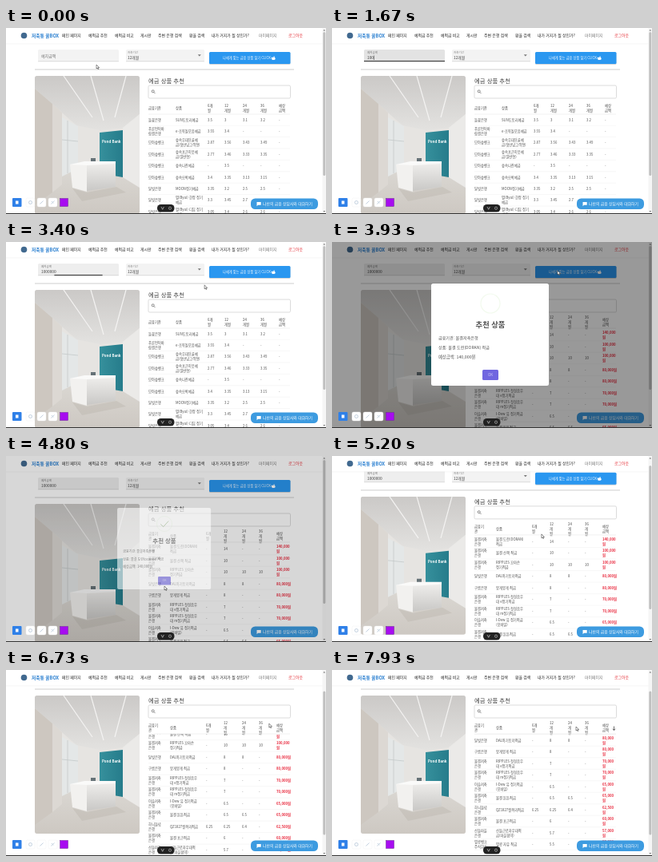
Recreate the animation shown at these times as an HTML page. Size 400 by 233 pixels, loop 8 s.

```html
<!DOCTYPE html>
<html lang="ko">
<head>
<meta charset="utf-8">
<style>
html, body { margin: 0; width: 100%; height: 100%; overflow: hidden; background: #fff; }
svg { display: block; width: 400px; height: 233px; }
text { font-family: 'Noto Sans CJK KR', 'Noto Sans CJK', sans-serif; white-space: pre; }
</style>
</head>
<body>
<svg id="stage" viewBox="0 0 400 233">
  <defs>
    <clipPath id="photoClip"><rect x="36" y="60" width="131" height="173" rx="3"/></clipPath>
    <clipPath id="rowClip"><rect x="176" y="108" width="182" height="160"/></clipPath>
    <linearGradient id="ceiling" x2="0" y2="1"><stop stop-color="#cbc9c7"/><stop offset="1" stop-color="#e3e2e0"/></linearGradient>
    <linearGradient id="floor" x2="0" y2="1"><stop stop-color="#dad7d2"/><stop offset="1" stop-color="#cdc8c2"/></linearGradient>
    <linearGradient id="desk" x2="0" y2="1"><stop stop-color="#efeeec"/><stop offset="1" stop-color="#c9c8c6"/></linearGradient>
    <linearGradient id="teal" x2="1"><stop stop-color="#36909c"/><stop offset="1" stop-color="#267c8b"/></linearGradient>
  </defs>
  <g id="page">
    <rect id="field" x="40" y="27" width="101" height="15" rx="1.5"/>
    <rect x="150" y="27" width="98" height="15" rx="1.5" fill="#f3f3f3"/>
    <path d="M40 41.8H141M150 41.8H248" stroke="#b4b4b4" stroke-width=".4"/>
    <rect id="underline" x="-50.5" y="40.9" width="101" height="1.2" fill="#444"/>
    <g id="label"></g>
    <rect id="caret" y="34.5" width=".5" height="5.5" fill="#222"/>
    <path d="M239.800 33.200h4l-2 2.200z" fill="#777"/>
    <rect x="254" y="30.400" width="101.500" height="15.500" rx="1.500" opacity=".15"/>
    <rect x="254" y="30" width="101.500" height="15" rx="1.500" fill="#2a97f0"/>
    <path d="M331.500 36.700h3v-1.200h1.200v1.500q1 .3 1 1.500t-1.500 1.500h-2.500l-.8-1.800z" fill="#fff"/>
    <path d="M36 52H360" stroke="#b9b9b9" stroke-width=".7"/>
    <g clip-path="url(#photoClip)">
      <rect x="36" y="60" width="131" height="173" fill="#e6e4e1"/>
      <path d="M36 60H167V108L146 125 117 128 88 122 36 76Z" fill="url(#ceiling)"/>
      <path d="M72 60 108 112M106 60 122 116M150 60 136 112" stroke="#f4f3f2" stroke-width="1.200"/>
      <path d="M36 204 82 178H146L167 194V233H36Z" fill="url(#floor)"/>
      <path d="M70 112 90 123V176L70 186Z" fill="#e4e7e7"/>
      <path d="M77 116V182M70 140 90 142" stroke="#c4caca" stroke-width=".8"/>
      <path d="M117 131 146 128V187L117 182Z" fill="url(#teal)"/>
      <path d="M146 125 167 108V200L146 187Z" fill="#ebeae8"/>
      <path d="M36 76 58 95V206L36 222Z" fill="#cdc7c0"/>
      <path d="M58 95 70 106V196L58 206Z" fill="#dcd8d3"/>
      <path d="M98 169H137V199L101 204Z" fill="url(#desk)"/>
      <path d="M80 171 101 169V205L83 200Z" fill="#f2f1ef"/>
      <path d="M80 171 98 167H137V170L101 172Z" fill="#fafaf9"/>
      <path d="M106 163h6v4h-6z" fill="#667277"/>
      <path d="M83 201 101 206 138 199 150 206 95 217Z" fill="#b4aea6" opacity=".35"/>
    </g>
    <rect id="search" x="178" y="72" width="177.500" height="16" rx="1.500" fill="#fff" stroke-width=".7"/>
    <g fill="none" stroke="#555" stroke-width=".7"><circle cx="183.700" cy="79.300" r="1.500"/><path d="M184.800 80.400 186.500 82.100"/></g>
    <g id="before"></g>
    <g id="after"></g>
    <path id="sortMark" d="M352.500 98.500v5m-1.800-1.800 1.800 1.800 1.800-1.800" fill="none" stroke="#333" stroke-width=".7"/>
  </g>
  <g id="header">
    <rect width="400" height="20.300" opacity=".05"/>
    <rect width="400" height="19.500" fill="#fff"/>
    <circle cx="22.500" cy="9.500" r="3.800" fill="#41698f"/>
  </g>
  <g id="chat">
    <rect x="306" y="213.500" width="84" height="13.500" rx="5.500" fill="#3d9be0"/>
    <path d="M313.500 218h5.200v3.800h-3.600l-1.600 1.400z" fill="#fff"/>
  </g>
  <rect x="395.500" width="4.500" height="233" fill="#f5f5f5"/>
  <path d="M396.500 3.500 397.800 1.700 399.100 3.500ZM396.500 229 397.800 230.800 399.100 229Z" fill="#777"/>
  <rect id="thumb" x="396.300" width="3" height="180" rx="1.500" fill="#c0c0c0"/>
  <rect id="shade" width="400" height="233"/>
  <g id="modal">
    <rect x="124" y="52" width="147" height="128" rx="2.500" fill="#fff"/>
    <circle cx="198" cy="77" r="12" fill="none" stroke="#a5dc86" stroke-opacity=".15" stroke-width="1.200"/>
    <path id="check" d="M192 77.500 196.300 81.700 204.500 72.700" pathLength="1" stroke-dasharray="1 2" fill="none" stroke="#a9c49a" stroke-width="1.200"/>
    <rect x="188" y="160" width="20" height="13" rx="1.500" fill="#7066e0"/>
  </g>
  <rect x="189" y="221" width="21.500" height="9.500" rx="4.500" fill="#222"/>
  <path d="M194 224l1.700 3.300 1.700-3.300" fill="none" stroke="#bbb" stroke-width=".8"/>
  <circle cx="205" cy="225.700" r="1.600" fill="none" stroke="#bbb" stroke-width=".7"/>
  <g id="tools">
    <rect x="8" y="213" width="11.500" height="11" rx="1" fill="#2f80e8"/>
    <path d="M12 216.500h3.500v4H12z" fill="#fff"/>
    <g fill="#fff" stroke="#f0f0f0" stroke-width=".4">
      <rect x="25" y="213" width="11" height="11" rx="2"/><rect x="39" y="213" width="11" height="11" rx="2"/><rect x="53" y="213" width="11" height="11" rx="2"/>
    </g>
    <g fill="none" stroke="#b3c4d6" stroke-width=".8"><circle cx="30.500" cy="218.500" r="2"/><path d="M42.500 220.500l4-4M56.500 220.500l4-4M57 217l2.500 2.500"/></g>
    <rect x="67.500" y="213.500" width="10" height="10" fill="#a70cf0" stroke="#6d2a93" stroke-width=".5"/>
  </g>
  <path d="M0 232.500H400" stroke="#333"/>
  <path id="cursor" d="M0 0V5L1.200 3.900 2 5.700 2.800 5.300 2 3.600H3.600Z" fill="#fff" stroke="#222" stroke-width=".5"/>
</svg>
<script>
const $ = id => document.getElementById(id);
const NS = 'http://www.w3.org/2000/svg';
const set = (el, attrs) => { for (const k in attrs) el.setAttribute(k, attrs[k]); return el; };
const add = (parent, tag, attrs = {}) => parent.appendChild(set(document.createElementNS(NS, tag), attrs));

// Draws text centred on y; "|" breaks the line.
function write(parent, x, y, str, size, fill = '#444', more = {}) {
  const lines = str.split('|');
  return lines.map((line, i) => {
    const mid = y + (i - (lines.length - 1) / 2) * 6;
    const el = add(parent, 'text', { x, y: mid + size * .36, 'font-size': size, fill, ...more });
    el.textContent = line;
    return el;
  })[0];
}
const centred = { 'text-anchor': 'middle' };

const oldRows = `들꽃은행;SUN도토리예금;3.5;3;3.1;3.2;-
푸른언덕바|람결은행;e-조약돌모음예금;3.55;3.4;-;-;-
모아숲뱅크;숲속우대단골예|금(첫만남고객형);2.87;3.56;3.43;3.49;-
모아숲뱅크;숲속포근이웃예|금(일반형);2.77;3.46;3.33;3.35;-
모아숲뱅크;숲속나란예금;-;3.5;-;-;-
모아숲뱅크;숲속또박예금;3.4;3.35;3.13;3.15;-
달빛은행;MOON정기예금;3.35;3.2;2.5;2.5;-
달빛은행;별(Byul) 한정 정기|예금;3.3;3.45;2.7;-;-
달빛은행;별(Byul) 디딤 정기|예금;3.05;3.4;2.6;2.6;-`;
const newRows = `물결저축|은행;물결 도란(DORAN)|적금;-;14;-;-;140,000|원
물결저축|은행;물결 산책 적금;-;10;-;-;100,000|원
물결저축|은행;RIPPLES 꼬마손|정기적금;-;10;10;10;100,000|원
달빛은행;DAL아기토끼적금;-;8;8;-;80,000원
구름은행;뭉게뭉게 적금;-;8;-;-;80,000원
물결저축|은행;RIPPLES 첫걸음우|대 e정기적금;-;7;-;-;70,000원
물결저축|은행;RIPPLES 첫걸음우|대 m정기적금;-;7;-;-;70,000원
이슬저축|은행;I-Dew 유 정기적금|(모바일);-;6.5;-;-;65,000원
물결저축|은행;물결 튼튼적금;-;6.5;6.5;-;65,000원
하늬들녘|은행;QZ1827월복리적금;6.25;6.25;6.4;-;62,500원
물결저축|은행;물결 포근적금;-;6;-;-;60,000원
산들마을|은행;산들근로자우대적|금(마을협약);-;5.7;-;-;57,000원
별콩뱅크|주식회사;별콩 자유 적금;-;5.5;-;-;55,000원`;

// Sums are drawn twice, for the wide and the narrow last column.
function table(parent, head, cols, rows, top, pitch) {
  head.split(';').forEach((s, i) => write(parent, cols[i], 100.5, s, 4.3, '#444'));
  add(parent, 'path', { d: 'M178 108H355', stroke: '#e2e2e2', 'stroke-width': .5 });
  const list = add(add(parent, 'g', { 'clip-path': 'url(#rowClip)' }), 'g');
  const wide = add(list, 'g'), narrow = add(list, 'g');
  rows.split('\n').forEach((row, r) => {
    const y = top + r * pitch;
    const cells = row.split(';');
    const sum = cells.pop();
    cells.forEach((s, i) => write(list, cols[i], y, s, 4.3, '#505050'));
    const style = sum == '-' ? ['#505050'] : ['#e8283c', { 'font-weight': 700 }];
    write(wide, cols[6], y, sum, 4.3, ...style);
    write(narrow, cols[6], y, sum.replace(/\|?원/, '|원'), 4.3, ...style);
    add(list, 'path', { d: `M178 ${y + pitch / 2}H355`, stroke: '#ebebeb', 'stroke-width': .4 });
  });
  return { list, wide, narrow };
}
const before = table($('before'), '금융기관;상품;6개|월;12|개월;24|개월;36|개월;예상|금액',
  [178, 212, 252, 273, 296, 318, 341], oldRows, 115, 14.4);
const after = table($('after'), '금융기|관;상품;6개|월;12|개|월;24|개|월;36|개|월;예상|금액',
  [178, 205, 250, 272, 295, 316, 338], newRows, 116.5, 14.5);
set(before.narrow, { opacity: 0 });

const page = $('page'), header = $('header'), modal = $('modal');
write($('label'), 0, 0, '예치금액', 5, '#777');
const amount = write(page, 44, 37.5, ' ', 4.8);
write(page, 152, 31, '저축기간', 3.5, '#888');
write(page, 152, 37.5, '12개월', 4.8);
write(page, 301, 37.7, '나에게 맞는 금융 상품 찾기 CLICK', 4.2, '#fff', centred);
write(page, 178, 66.5, '예금 상품 추천', 7.4, '#444');
write(page, 120, 142, 'Pond Bank', 4.4, '#fff', { 'font-weight': 700 });

write(header, 32, 9.5, '저축통 꿀BOX', 5.7, '#2a7fd0', { 'font-weight': 700 });
[[70, '메인 페이지'], [103, '예적금 추천'], [136, '예적금 비교'], [168, '게시판'], [190, '주변 은행 검색'],
 [229, '환율 검색'], [257, '내가 거지가 될 상인가?'], [316, '마이페이지', '#777'], [353, '로그아웃', '#e5343c']]
  .forEach(([x, s, fill = '#222']) => write(header, x, 9.7, s, 4.9, fill));
write($('chat'), 321, 220.2, '나만의 금융 상담사와 대화하기', 4.85, '#fff', { 'font-weight': 500 });

write(modal, 198, 104, '추천 상품', 9.3, '#545454', { ...centred, 'font-weight': 700 });
write(modal, 133, 120.5, '금융기관: 물결저축은행', 5.1, '#545454');
write(modal, 133, 132.5, '상품: 물결 도란(DORAN) 적금', 5.1, '#545454');
write(modal, 133, 144, '예상금액: 140,000원', 5.3, '#545454');
write(modal, 198, 166.5, 'OK', 4.4, '#cfcbf6', centred);

const ease = k => k * k * (3 - 2 * k);
const ramp = (t, a, b) => Math.min(1, Math.max(0, (t - a) / (b - a)));
// Value at t along [time, value] keys.
function along(t, keys, curve = ease) {
  let v = keys[0][1];
  for (let i = 1; i < keys.length; i++)
    v += (keys[i][1] - keys[i - 1][1]) * curve(ramp(t, keys[i - 1][0], keys[i][0]));
  return v;
}
const path = [[0, 113, 46], [500, 100, 44], [2750, 100, 44], [3350, 244, 56], [3600, 282, 36], [3980, 282, 36],
  [4500, 198, 163], [4850, 198, 163], [5450, 300, 59], [6300, 300, 53], [7000, 343, 74], [7350, 343, 74], [7800, 305, 71]];
const xs = path.map(p => [p[0], p[1]]), ys = path.map(p => [p[0], p[2]]);
const FOCUS = 600, BLUR = 3300, OPEN = 3600, CLOSE = 4740, SORT = 6900;

function render(t) {
  const scroll = along(t, [[4950, 0], [5500, 21], [5900, 21], [6300, 28]]);
  set(page, { transform: `translate(0 ${-scroll})` });
  set($('thumb'), { y: 5 + scroll * .77 });
  set(after.list, { transform: `translate(0 ${-along(t, [[6400, 0], [7050, 44]])})` });

  const focused = t >= FOCUS && t < BLUR;
  const lift = ease(ramp(t, FOCUS, FOCUS + 150));
  const line = ramp(t, FOCUS, FOCUS + 250) - ramp(t, BLUR, BLUR + 250);
  const typed = '1000000'.slice(0, Math.max(0, Math.floor((t - 1200) / 130)));
  set($('field'), { fill: focused ? '#e3e3e3' : t < FOCUS ? '#f3f3f3' : '#eeeeee' });
  set($('label'), { transform: `translate(44 ${35 - 4 * lift}) scale(${1 - .3 * lift})` });
  set($('underline'), { transform: `translate(90.5 0) scale(${line} 1)` });
  amount.textContent = typed;
  set($('caret'), { x: 44.4 + typed.length * 2.67, opacity: +(focused && (t > 1200 && t < 2300 || t % 1000 < 500)) });

  const swapped = t >= OPEN, sorting = t >= SORT;
  set($('before'), { opacity: +!swapped });
  set($('after'), { opacity: +swapped });
  set($('sortMark'), { opacity: +sorting });
  set(after.wide, { opacity: +!sorting });
  set(after.narrow, { opacity: +sorting });

  const hide = ramp(t, CLOSE, CLOSE + 150);
  const pop = along(t, [[OPEN, .7], [OPEN + 135, 1.05], [OPEN + 240, .95], [OPEN + 300, 1]], k => k) - .5 * hide;
  set(modal, { opacity: t < OPEN ? 0 : 1 - hide, transform: `translate(198 116) scale(${pop}) translate(-198 -116)` });
  set($('shade'), { opacity: .4 * (ramp(t, OPEN, OPEN + 100) - ramp(t, CLOSE, CLOSE + 100)) });
  set($('check'), { 'stroke-dashoffset': 1.05 - 1.05 * ramp(t, OPEN + 350, OPEN + 650) });

  // The pointer gives way to a text cursor over fields.
  const x = along(t, xs), y = along(t, ys);
  const searching = t > CLOSE && y + scroll > 72 && y + scroll < 88 && t < SORT;
  const typing = t > 1200 && t < 2600;
  set($('search'), { stroke: searching ? '#808080' : '#cdcdcd' });
  set($('cursor'), { transform: `translate(${x} ${y})`, opacity: +!(typing || searching) });
}
function frame() {
  render(performance.now() % 8000);
  requestAnimationFrame(frame);
}
frame();
</script>
</body>
</html>
```
